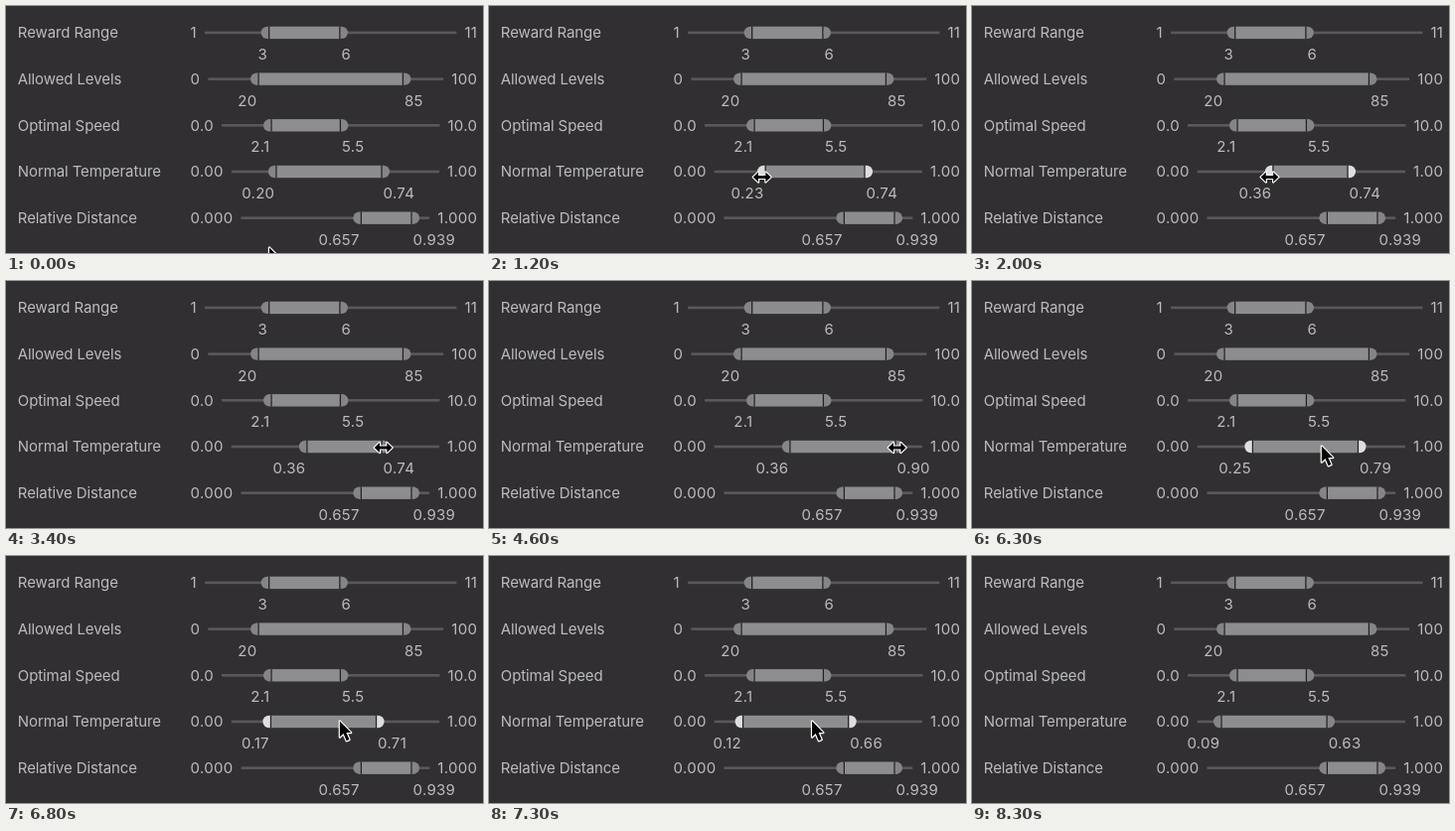
An HTML page for the animation above (9000 ms loop, 480 by 249 pixels).

```html
<!DOCTYPE html>
<html lang="en">
<head>
<meta charset="utf-8">
<title>Range sliders</title>
<style>
  html, body { margin: 0; width: 100%; height: 100%; overflow: hidden; background: #312f32; }
  svg { display: block; width: 480px; height: 249px; }
  text { font: 400 15px Inter, "Open Sans", sans-serif; letter-spacing: -.1px; fill: #bdbcbd; }
  .num { letter-spacing: .3px; }
  .end { text-anchor: end; }
  .track { fill: #5a585b; }
  .bar { fill: #8d8c8e; }
  .cap { fill: #858486; }
  .active .cap { fill: #dededf; }
  .gap { fill: #201f21; }
  .cursor { fill: #000; stroke: #fff; stroke-width: 2.4; stroke-linejoin: round; paint-order: stroke; }
</style>
</head>
<body>
<svg id="stage" viewBox="0 0 480 249"></svg>
<script>
const LOOP = 9000, STEP = 100;
const ROW = 46.7, MARGIN = 8, CAP = 7.8, HALF = 6.2;
const stage = document.getElementById('stage');

function add(parent, tag, attrs, content = '') {
  const el = document.createElementNS('http://www.w3.org/2000/svg', tag);
  for (const key in attrs) el.setAttribute(key, attrs[key]);
  el.textContent = content;
  parent.appendChild(el);
  return el;
}

const place = (el, x, y) => el.setAttribute('transform', `translate(${x} ${y})`);

// The track fills the room between the two limits; the thumbs run along it.
function makeSlider({ name, min = 0, max, low, high, digits }, row) {
  const y = 26.9 + row * ROW, base = y + 5.2;
  const g = add(stage, 'g', {});
  add(g, 'text', { x: 11.8, y: base }, name);
  const minText = add(g, 'text', { x: 185.6, y: base, class: 'num' }, min.toFixed(digits));
  const maxText = add(g, 'text', { x: 474.2, y: base, class: 'num end' }, max.toFixed(digits));
  const x0 = 185.6 + minText.getComputedTextLength() + MARGIN;
  const x1 = 474.2 - maxText.getComputedTextLength() - MARGIN;
  const span = x1 - x0 - 2 * CAP;

  add(g, 'rect', { x: x0, y: y - 1.3, width: x1 - x0, height: 2.6, class: 'track' });
  const bar = add(g, 'rect', { y: y - HALF, height: 2 * HALF, class: 'bar' });
  const thumbs = [-1, 1].map(side => {
    const thumb = add(g, 'g', {});
    const sweep = side > 0 ? 1 : 0;
    add(thumb, 'rect', { x: -.65, y: -HALF, width: 1.3, height: 2 * HALF, class: 'gap' });
    add(thumb, 'path', {
      d: `M${side * .6} ${-HALF}h${side * 1.2}a${HALF} ${HALF} 0 0 ${sweep} 0 ${2 * HALF}h${-side * 1.2}z`,
      class: 'cap'
    });
    const label = add(g, 'text', { y: base + 21.7, class: side < 0 ? 'num end' : 'num' });
    return { thumb, label, side };
  });

  function set(...values) {
    const xs = values.map((v, i) => x0 + (i ? 8 : 6.4) + span * (v - min) / (max - min));
    bar.setAttribute('x', xs[0]);
    bar.setAttribute('width', xs[1] - xs[0]);
    thumbs.forEach(({ thumb, label, side }, i) => {
      place(thumb, xs[i], y);
      label.setAttribute('x', xs[i] + side * 1.5);
      label.textContent = values[i].toFixed(digits);
    });
  }
  set(low, high);
  return { g, set, span };
}

const sliders = [
  { name: 'Reward Range', min: 1, max: 11, low: 3.45, high: 6.38, digits: 0 },
  { name: 'Allowed Levels', max: 100, low: 20, high: 85, digits: 0 },
  { name: 'Optimal Speed', max: 10, low: 2.14, high: 5.47, digits: 1 },
  { name: 'Normal Temperature', max: 1, low: .2, high: .74, digits: 2 },
  { name: 'Relative Distance', max: 1, low: .657, high: .939, digits: 3 }
].map(makeSlider);
const temperature = sliders[3];

const arrow = add(stage, 'path', {
  class: 'cursor', d: 'M1 1.6V17.6L4.7 14.1L7.8 21.3L10.6 20.1L7.5 13H12.3Z'
});
const resize = add(stage, 'path', {
  class: 'cursor', d: 'M-8.9 0L-3.7-5V-1.4H3.7V-5L8.9 0L3.7 5V1.4H-3.7V5Z'
});

const ramp = (t, from, to) => Math.min(1, Math.max(0, (t - from) / (to - from)));
const within = (t, from, to) => t >= from && t < to;

// Free pointer moves between the drags
const moves = [
  { from: 0, to: 700, dx: 4.5, dy: -69.5 },
  { from: 2000, to: 3000, dx: 87, dy: -.5, sag: 7 },
  { from: 3000, to: 3400, dx: -6.8, dy: -4 },
  { from: 4600, to: 5000, dx: -44, dy: 21 },
  { from: 5100, to: 5500, dx: 4.7, dy: -24 },
  { from: 8000, to: 8200, dx: -23, dy: 28 }
];

function draw(time) {
  const t = Math.floor(time % LOOP / STEP) * STEP;

  // Drag the low thumb, then the high thumb, then the whole bar
  const raise = .16 * ramp(t, 1000, 2000);
  const widen = .16 * ramp(t, 3500, 4500);
  const slide = .268 * (1 - (1 - ramp(t, 5800, 7800)) ** 1.75);
  temperature.set(.2 + raise - slide, .74 + widen - slide);
  const active = within(t, 1100, 2100) || within(t, 3600, 4600) || within(t, 5900, 7900);
  temperature.g.setAttribute('class', active ? 'active' : '');

  let x = 264 + temperature.span * (raise + widen - slide), y = 242;
  for (const { from, to, dx, dy, sag = 0 } of moves) {
    const u = ramp(t, from, to);
    x += dx * u;
    y += dy * u + sag * Math.sin(Math.PI * u);
  }
  const resizing = within(t, 600, 2200) || within(t, 3300, 4700);
  for (const cursor of [arrow, resize]) {
    const shown = t < 8300 && (cursor === resize) === resizing;
    cursor.setAttribute('visibility', shown ? 'visible' : 'hidden');
    place(cursor, x, y);
  }
}

const start = performance.now();
function tick() {
  draw(performance.now() - start);
  requestAnimationFrame(tick);
}
tick();
</script>
</body>
</html>
```
